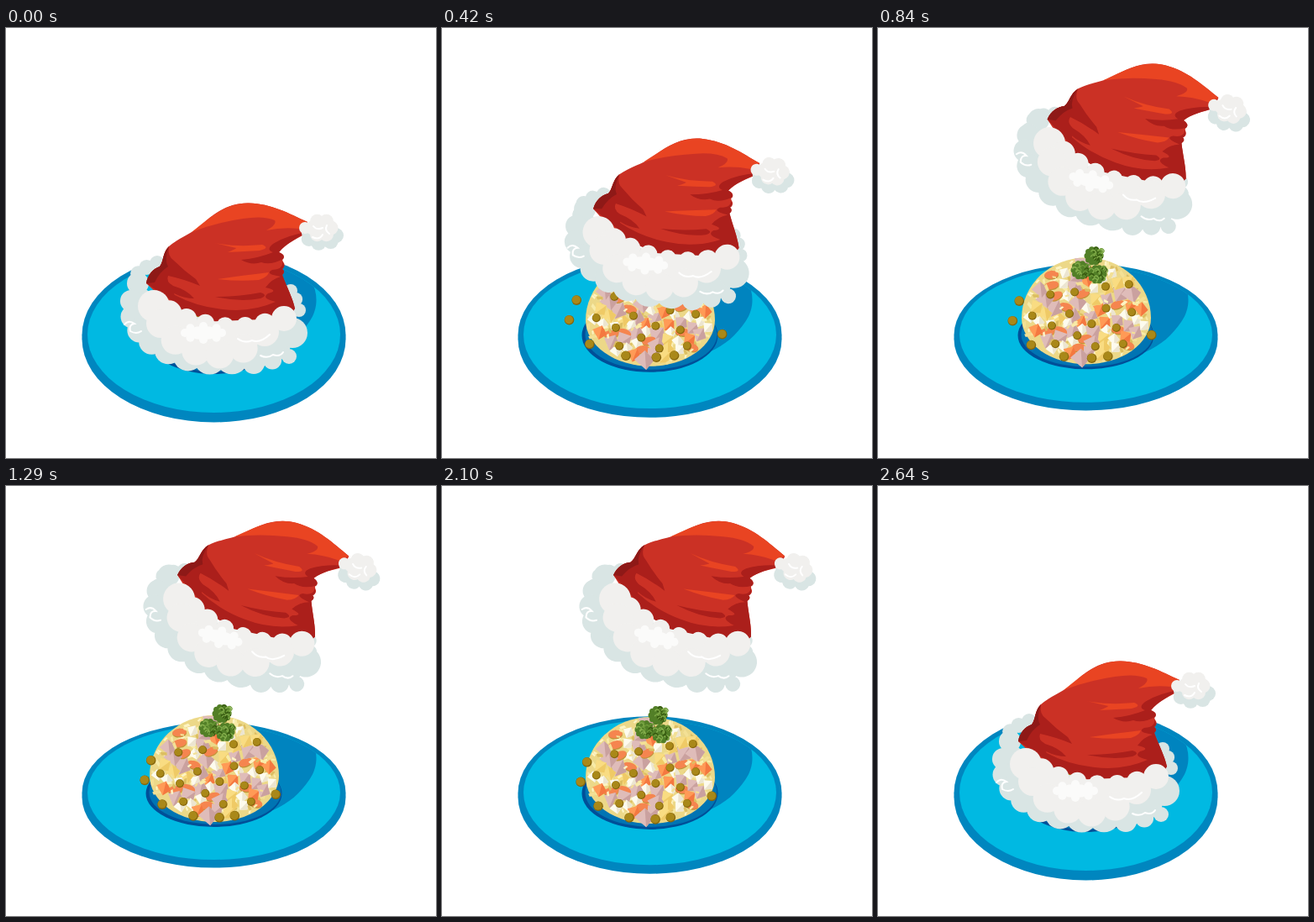
An HTML page that plays this animation: 512x512 px, repeating every 2.7 s.

```html
<!DOCTYPE html>
<html lang="en">
<head>
<meta charset="utf-8">
<title>Festive salad</title>
<style>
html, body { margin: 0; width: 100%; height: 100%; overflow: hidden; background: #fff; }
svg { display: block; width: 100vw; height: 100vh; }
</style>
</head>
<body>
<svg viewBox="0 0 512 512">
  <clipPath id="well"><ellipse id="wellEdge" cx="247.5" cy="365" rx="150.5"/></clipPath>
  <g id="plate">
    <ellipse id="under" cx="247.5" cy="370.5" rx="157" fill="#0086bf"/>
    <ellipse id="rim" cx="247.5" cy="365.5" rx="157" fill="#0086bf"/>
    <ellipse id="dish" cx="247.5" cy="365" rx="150.5" fill="#00b9e2"/>
    <path clip-path="url(#well)" fill="#0084bf" d="M275 262L330 268L363 300C372 316 372 334 361 350C350 366 338 377 318 386L280 395Z"/>
    <ellipse id="pit" cx="247.5" cy="366" rx="81" fill="#004f98"/>
    <ellipse id="pitFloor" cx="249" cy="365" rx="78.500" fill="#0074b3"/>
  </g>
  <g id="salad">
    <path fill="#ecd888" d="M171 345A77 72 0 0 1 325 345A77 55 0 0 1 171 345Z"/>
  </g>
  <g id="hat">
    <g id="furBack" fill="#d9e5e4"></g>
    <g id="furRim" fill="#d9e5e4"><path d="M158 304L200 338L265 352L344 340L345 370L255 402L160 366Z"/></g>
    <g id="crown">
      <path fill="#cb3125" d="M167 304C169 293 175 287 183 284C188 278 186 268 194 260C206 250 220 245 230 237C247 221 264 208 289 208.500C316 209 337 221 359 231L357 245C344 252 333 257 325 267Q333 270 330 275Q328 276 331 280Q333 284 329 287Q333 290 329 294C334 308 341 320 344 334L330 350H270L200 335Z"/>
      <path fill="#e94422" d="M221 243C246 223 263 208 289 208.500C316 209 337 221 359 231L349 239Q329 237 310 241Q323 234 320 229Q307 223 282 227Q248 232 221 243Z"/>
      <g fill="#ab1f1b">
        <path d="M167 304C169 293 175 287 183 284C188 278 186 268 194 260Q192 272 200 277Q212 289 226 299L231 307Q212 299 193 295Q190 302 199 307Q216 312 224 322Q212 322 200 316L204 329Z"/>
        <path d="M358 243C344 252 333 257 325 267Q333 270 330 275Q315 283 304 279Q292 283 280 276Q301 274 318 267Q309 264 318 257Q334 247 358 243Z"/>
        <path d="M329 278Q333 284 329 287Q333 290 329 294C334 308 341 320 344 334L336 348L262 354L199 334V317Q227 332 258 335Q292 339 321 326Q303 322 312 316Q326 313 309 309Q316 299 327 296Q307 293 317 288Q331 287 329 278Z"/>
        <path d="M249 320Q277 320 303 315Q313 318 303 322Q279 327 249 320Z"/>
      </g>
      <path fill="#8e1917" d="M167 304C169 293 175 287 183 284C188 278 186 268 194 260Q188 276 193 284Q183 290 177 303Z"/>
      <path fill="#e94422" d="M249 256Q275 261 305 258Q315 262 302 265Q285 266 264 267Q274 263 274 262ZM252 299Q280 295 313 291Q311 297 301 300Q277 302 252 299Z"/>
      <g id="furFront" fill="#f1f0ee"><path d="M170 335L230 350L330 346L316 372L250 392L188 358Z"/></g>
      <g id="furLight" fill="#fbfbfa"><ellipse cx="235" cy="363" rx="20" ry="8"/></g>
      <path fill="none" stroke="#fff" stroke-width="2" stroke-linecap="round" d="M141 353Q146 347 153 352Q146 353 148 361Q155 365 161 361M276 370Q284 376 293 372Q302 376 314 365M303 390Q311 394 318 389Q326 392 330 386"/>
    </g>
    <g id="pomBack" fill="#d9e5e4"></g>
    <g id="pomFront" fill="#f1f0ee"><circle cx="376" cy="238" r="11"/><circle cx="356" cy="238" r="7"/></g>
    <path fill="none" stroke="#fff" stroke-width="2" stroke-linecap="round" d="M366 236Q370 241 377 238M382 235Q379 241 385 245M365 249Q373 253 377 246"/>
  </g>
</svg>
<script>
const $ = id => document.getElementById(id);
const salad = $('salad');
const { PI, sin, cos, sqrt, min, max } = Math;
const mix = (a, b, p) => a + (b - a) * p;

let seed = 7;
function rnd(a = 0, b = 1) {
  seed = seed * 16807 % 2147483647;
  return mix(a, b, seed / 2147483647);
}
const pick = list => list[Math.floor(rnd(0, list.length))];

function set(el, attrs) {
  for (const k in attrs) el.setAttribute(k, attrs[k]);
  return el;
}
const add = (parent, tag, attrs) =>
  parent.appendChild(set(document.createElementNS('http://www.w3.org/2000/svg', tag), attrs));

// Puffs strung along a cubic curve, radius given by its parameter
function row(parent, [x0, y0, x1, y1, x2, y2, x3, y3], count, radius) {
  for (let i = 0; i < count; i++) {
    const t = i / (count - 1), u = 1 - t;
    const at = (a, b, c, d) => u * u * u * a + 3 * u * u * t * b + 3 * u * t * t * c + t * t * t * d;
    add(parent, 'circle', { cx: at(x0, x1, x2, x3), cy: at(y0, y1, y2, y3), r: radius(t) });
  }
}
// Puffs spread around an ellipse
function ring(parent, cx, cy, rx, ry, count, r, fill) {
  for (let i = 0; i < count; i++) {
    const a = i / count * 2 * PI;
    const puff = add(parent, 'circle', { cx: cx + rx * cos(a), cy: cy + ry * sin(a), r });
    if (fill) puff.setAttribute('fill', fill);
  }
}

row($('furBack'), [154, 306, 152, 288, 168, 285, 180, 280], 4, () => 9);
row($('furBack'), [339, 313, 343, 320, 348, 325, 349, 336], 3, () => 8);
row($('furRim'), [157, 304, 110, 385, 270, 426, 341, 363], 12, t => 13 + 6 * sin(PI * t * t) + 5 * t ** 6);
row($('furRim'), [295, 399, 310, 397, 325, 394, 337, 391], 3, t => 13 - 4 * t);
row($('furFront'), [176, 331, 215, 352, 280, 364, 331, 346], 8, t => 19 - 27 * t * (1 - t) - 4 * t);
row($('furFront'), [184, 352, 206, 390, 270, 406, 308, 362], 6, () => 17);
ring($('furLight'), 235, 363, 22, 8, 8, 5);
ring($('pomBack'), 376, 247, 17, 9, 7, 9);
ring($('pomFront'), 376, 238, 11, 9, 6, 8.5);

function cube(x, y, s, light, dark) {
  const g = add(salad, 'g', { transform: `translate(${x} ${y}) rotate(${rnd(-35, 35)}) scale(${s})` });
  add(g, 'path', { d: 'M-1 -.6L.5 -1L1 .4L-.3 1Z', fill: light });
  add(g, 'path', { d: 'M.5 -1L1 .4L-.3 1L.1 0Z', fill: dark });
}
function slice(x, y) {
  const g = add(salad, 'g', { transform: `translate(${x} ${y}) rotate(${rnd(-25, 25)})` });
  add(g, 'ellipse', { cy: 1, rx: 8.5, ry: 5, fill: '#c09438' });
  add(g, 'ellipse', { rx: 8.5, ry: 4.7, fill: '#f5854f' });
}
function pea(x, y, r) {
  const g = add(salad, 'g', { transform: `translate(${x} ${y})` });
  add(g, 'circle', { r, fill: '#86660c' });
  add(g, 'circle', { cx: -.4, cy: -.5, r: r * .86, fill: '#a98819' });
  return g;
}

// Place on the mound: r from 0 (middle) to 1 (edge)
const mound = (r, a) => [248 + 75 * r * cos(a), 345 + (sin(a) < 0 ? 70 : 53) * r * sin(a)];

function flecks(count) {
  for (let i = 0; i < count; i++) {
    const [x, y] = mound(sqrt(rnd()), rnd(0, 2 * PI));
    add(salad, 'path', {
      d: 'M-4 -1L3 -2L4 1L-2 2Z', fill: pick(['#f8eba8', '#f3e095', '#fdf4c4', '#dcbe62']),
      transform: `translate(${x} ${y}) rotate(${rnd(0, 180)}) scale(${rnd(.6, 1.2)})`
    });
  }
}

const ham = (x, y) => cube(x, y, rnd(8, 11), '#dfbcb9', '#caa19f');
const carrot = (x, y) => rnd() < .3 ? cube(x, y, 8, '#ff9a56', '#f47840') : slice(x, y);
const egg = (x, y) => cube(x, y, 6.5, '#fdfbee', '#ece5d0');
const potato = (x, y) => cube(x, y, 8, '#f9dc82', '#efca66');
const mix7 = [ham, carrot, egg, potato, ham, carrot, egg];

flecks(170);
const PIECES = 77, GOLDEN = PI * (3 - sqrt(5));
for (let i = 0; i < PIECES; i++) mix7[i % 7](...mound(.93 * sqrt((i + .5) / PIECES), i * GOLDEN));
flecks(50);
for (let i = 0; i < 16; i++) pea(...mound(.9 * sqrt((i + .5) / 16), i * GOLDEN + 1), 5);

// Parsley: three leafy clumps with curled veins
for (const [x, y] of [[257, 271], [241, 288], [261, 293]]) {
  ring(salad, x, y, 8, 8, 10, 3.5, '#527f27');
  add(salad, 'circle', { cx: x, cy: y, r: 9, fill: '#527f27' });
  for (let i = 0; i < 14; i++) {
    add(salad, 'path', {
      d: `M${x + rnd(-10, 7)} ${y + rnd(-8, 8)}q2 -4 5 -1q2 2 -1 4`, fill: 'none',
      stroke: pick(['#35570f', '#86b04e', '#6f9c3a']), 'stroke-width': 1.3
    });
  }
}

// Loose peas around the foot of the mound, by angle in degrees
const rollers = [205, 176, 138, 107, 85, 72, 25].map(deg => ({ a: deg * PI / 180, el: pea(0, 0, 5.8) }));

const LOOP = 2700, STEP = 30;

function draw(t) {
  const ease = (from, to) => (1 - cos(PI * min(1, max(0, (t - from) / (to - from))))) / 2;
  const lift = ease(0, 890) - ease(2100, 2465);
  const tilt = ease(0, 1000) - ease(2100, 2500);
  const flat = ease(0, 1000) - ease(1710, 2510);
  const roll = ease(0, 1290);

  const rim = mix(99, 84, flat), dish = mix(93, 80, flat), pit = mix(46, 40, flat);
  for (const [id, ry] of [
    ['rim', rim], ['under', rim], ['dish', dish], ['wellEdge', dish], ['pit', pit], ['pitFloor', pit - 2]
  ]) set($(id), { ry });

  set(salad, { transform: `translate(0 ${mix(4.3, 0, flat)})` });
  for (const { a, el } of rollers) {
    const x = 247 + 82 * cos(a) * mix(1.22, 1, roll);
    const y = 347 + 48 * sin(a) - 7 * (1 - roll);
    set(el, { transform: `translate(${x} ${y})` });
  }

  set($('hat'), {
    transform: `translate(${mix(250, 279.7, tilt)} ${mix(320, 145.2, lift)}) rotate(${14.5 * tilt}) translate(-250 -320)`
  });
  // The far side of the brim sinks out of view as the hat tips
  set($('furBack'), { transform: `translate(${-6 * tilt} ${14 * tilt})` });
  set($('crown'), { transform: `translate(0 ${-3 * tilt})` });
}

const begin = performance.now();
function tick() {
  const t = (performance.now() - begin) % LOOP;
  draw(Math.floor(t / STEP) * STEP);
  requestAnimationFrame(tick);
}
tick();
</script>
</body>
</html>
```
